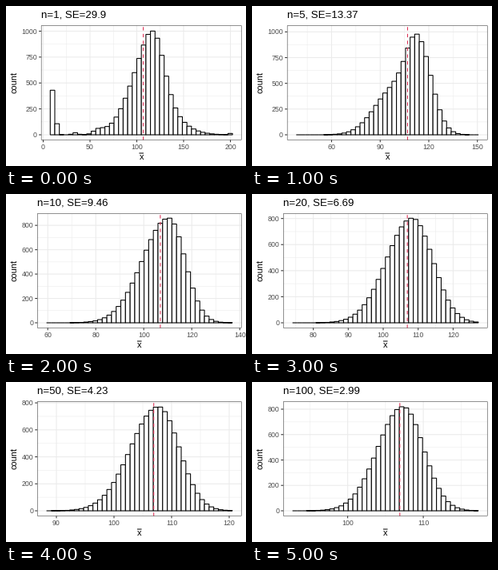
A matplotlib script that plays this animation: 300 by 200 pixels, repeating every 6000 ms.

```python
import matplotlib.pyplot as plt
import numpy as np
from matplotlib.animation import FuncAnimation
from matplotlib.patches import Rectangle

W, H, DPI = 300, 200, 100
PX = 72 / DPI                      # points per pixel
TOP, BOTTOM, RIGHT = 24.3, 167.5, 294.5
PAD = (BOTTOM - TOP) / 22          # 5 % of the data range on each side
BASE, PEAK = BOTTOM - PAD, TOP + PAD
BINS, MEAN, LINE = 40, 106.9, 1.07
INK, GRID, GREY = "#333333", "#ebebeb", "#4d4d4d"

plt.rcParams["font.family"] = "Liberation Sans"

# x: reference value, its pixel, pixels per unit
# humps: centre bin, height, left and right spread
PLOTS = [
    dict(n=1, se="29.9", left=43.9, x=(0, 46.5, 1.17), xstep=50, ystep=250,
         peak=1005, humps=[(0, 430, 0.6, 0.6), (5, 20, 0.6, 0.6),
                           (10, 45, 1, 1.5), (19.5, 540, 3.6, 5.4),
                           (22.3, 520, 2.4, 2.2), (39, 12, 0.3, 0.3)]),
    dict(n=5, se="13.37", left=43.9, x=(60, 99.5, 2.025), xstep=30, ystep=250,
         peak=1012, humps=[(21, 440, 4.3, 4.3), (26.3, 760, 2.5, 2.95)]),
    dict(n=10, se="9.46", left=39, x=(60, 52.2, 3.0), xstep=20, ystep=200,
         peak=855, humps=[(25.8, 860, 5.6, 3.5)]),
    dict(n=20, se="6.69", left=39, x=(80, 76.6, 4.37), xstep=10, ystep=200,
         peak=799, humps=[(25.3, 803, 5.5, 4.4)]),
    dict(n=50, se="4.23", left=39, x=(90, 63, 7.2), xstep=10, ystep=200,
         peak=772, humps=[(23.6, 772, 5.95, 4.45)]),
    dict(n=100, se="2.99", left=39, x=(100, 119.6, 9.45), xstep=10, ystep=200,
         peak=820, humps=[(23.3, 820, 5.4, 4.4)]),
]

fig = plt.figure(figsize=(W / DPI, H / DPI), dpi=DPI, facecolor="white")
ax = fig.add_axes([0, 0, 1, 1])


def counts(humps):
    """Sum of bells, each with its own spread on either side."""
    k = np.arange(BINS)
    total = np.zeros(BINS)
    for mid, height, low, high in humps:
        z = (k - mid) / np.where(k < mid, low, high)
        total += height * np.exp(-z * z / 2)
    return total.round()


def stroke(xs, ys, color, width, **kw):
    ax.plot(xs, ys, color=color, lw=width * PX, snap=False,
            solid_capstyle="butt", dash_capstyle="butt", **kw)


def box(x, y, w, h, fill, edge, width, z):
    ax.add_patch(Rectangle((x, y), w, h, facecolor=fill, edgecolor=edge,
                           lw=width * PX, joinstyle="miter", snap=False,
                           zorder=z))


def label(x, y, s, size, color="black", ha="center", **kw):
    ax.text(x, y, s, fontsize=size * PX, color=color, ha=ha, va="baseline",
            **kw)


def draw_scales(p, to_x, to_y):
    # half steps get a thin grid line; whole steps a full one, tick and label
    left = p["left"]
    for k in range(60):
        major = k % 2 == 0
        width = LINE if major else LINE / 2
        vx, vy = k * p["xstep"] / 2, k * p["ystep"] / 2
        x, y = to_x(vx), to_y(vy)
        if left < x < RIGHT:
            stroke([x, x], [TOP, BOTTOM], GRID, width, zorder=1)
            if major:
                stroke([x, x], [BOTTOM, BOTTOM + 2.75], INK, LINE, zorder=5)
                label(x, 179, f"{vx:.0f}", 8.8, GREY)
        if TOP < y < BOTTOM:
            stroke([left, RIGHT], [y, y], GRID, width, zorder=1)
            if major:
                stroke([left - 2.75, left], [y, y], INK, LINE, zorder=5)
                label(left - 4.95, y + 3.1, f"{vy:.0f}", 8.8, GREY, "right")


def draw(i):
    p = PLOTS[i]
    left = p["left"]
    mid = (left + RIGHT) / 2
    ref, ref_px, per = p["x"]
    unit = (BASE - PEAK) / p["peak"]

    def to_x(v):
        return ref_px + (v - ref) * per

    def to_y(v):
        return BASE - v * unit

    ax.clear()
    ax.set_xlim(0, W)
    ax.set_ylim(H, 0)
    ax.axis("off")
    draw_scales(p, to_x, to_y)

    pad = (RIGHT - left) / 22
    step = (RIGHT - left - 2 * pad) / BINS
    for k, v in enumerate(counts(p["humps"])):
        box(left + pad + k * step, BASE, step, -v * unit, "white", "black",
            LINE, 3)

    x = to_x(MEAN)
    stroke([x, x], [BOTTOM, TOP], "#df2f55", LINE, ls=(0, (4, 4)), zorder=4)

    # only the inner half of the border shows
    inset = LINE / 4
    box(left + inset, TOP + inset, RIGHT - left - 2 * inset,
        BOTTOM - TOP - 2 * inset, "none", INK, LINE / 2, 5)

    label(left, 15, f"n={p['n']}, SE={p['se']}", 13.2, ha="left")
    label(13.4, (TOP + BOTTOM) / 2, "count", 11, rotation=90,
          rotation_mode="anchor")
    label(mid, 192, "x", 11)
    stroke([mid - 2.8, mid + 2.8], [184, 184], "black", 1)
    return []


anim = FuncAnimation(fig, draw, frames=len(PLOTS), interval=1000,
                     init_func=lambda: draw(0), repeat=True, repeat_delay=0,
                     blit=False)
plt.show()
```
